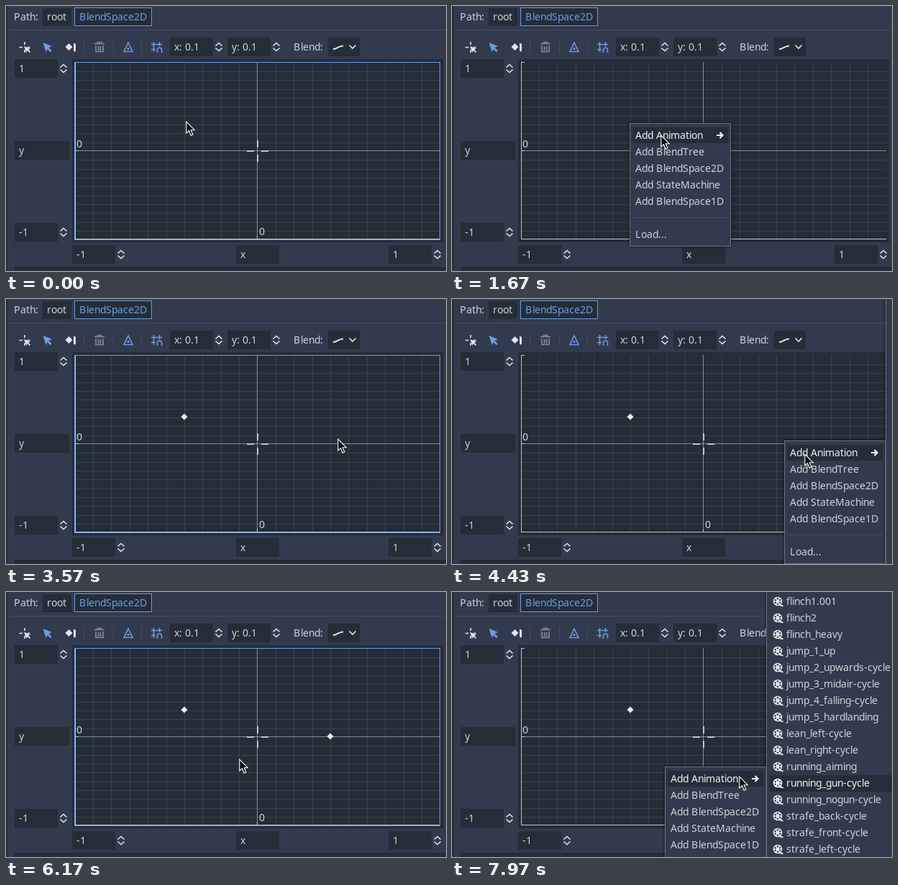
Animation of 612 by 369 pixels, one loop 8000 ms. Source, as an HTML page:

```html
<!DOCTYPE html>
<html lang="en">
<head>
<meta charset="utf-8">
<title>Blend space editor</title>
<style>
  :root { --base: #323a4d; --dark: #242d38; --text: #cfd2d7; --accent: #6a9ce6; --white: #e4e6e9; }
  html, body { margin: 0; width: 100%; height: 100%; overflow: hidden; background: var(--base); }
  svg { display: block; }
  text { font: 14px "Noto Sans", sans-serif; fill: var(--text); white-space: pre; }
  .crisp { shape-rendering: crispEdges; }
  .field { fill: var(--dark); shape-rendering: crispEdges; }
  .sep { fill: #454e62; shape-rendering: crispEdges; }
  .line { fill: none; stroke: var(--white); stroke-width: 1.6; }
  .blue { stroke: var(--accent); }
  .axis { fill: #c3c7cc; }
  .popup { fill: var(--base); stroke: #6b7488; shape-rendering: crispEdges; }
  .shade { filter: drop-shadow(0 0 2px rgba(0, 0, 0, .7)); }
  .hover { fill: #1f2731; shape-rendering: crispEdges; }
  .glow { fill: #222; mix-blend-mode: color-dodge; shape-rendering: crispEdges; }

  .anim { animation: 8s step-end infinite; }
  #cursor { animation-name: cursor; }
  #menu { animation-name: menu; }
  .menu-hover { animation-name: menu-hover; }
  #sub { animation-name: sub; }
  .sub-hover { animation-name: sub-hover; }
  #focus { animation-name: focus; }
  #left { animation-name: left; }
  #right { animation-name: right; }

  @keyframes left { 0% { opacity: 0 } 34.625%, 100% { opacity: 1 } }
  @keyframes right { 0% { opacity: 0 } 70.375%, 100% { opacity: 1 } }
  @keyframes focus {
    0%, 34.625%, 70.375% { opacity: 1 }
    10.875%, 46.625%, 82.125%, 100% { opacity: 0 }
  }
  @keyframes menu {
    0%, 34.625%, 70.375% { opacity: 0; transform: none }
    10.875% { opacity: 1; transform: translate(247px, 163px) }
    46.625% { opacity: 1; transform: translate(462px, 197px) }
    82.125%, 100% { opacity: 1; transform: translate(296px, 243px) }
  }
  @keyframes menu-hover {
    0%, 34.625%, 70.375% { opacity: 0 }
    18.75%, 52.125%, 91.25%, 100% { opacity: 1 }
  }
  @keyframes sub {
    0%, 34.625%, 70.375% { opacity: 0; transform: none }
    21.625% { opacity: 1; transform: translateX(388px) }
    55.375% { opacity: 1; transform: translateX(603px) }
    95%, 100% { opacity: 1; transform: translateX(437px) }
  }
  @keyframes sub-hover {
    0%, 34.625%, 70.375% { opacity: 0; transform: none }
    28.375% { opacity: 1; transform: translateY(163px) }
    65.875% { opacity: 1; transform: translateY(209px) }
    99.625%, 100% { opacity: 1; transform: translateY(255px) }
  }
  @keyframes cursor {
    0% { transform: translate(250px, 160px) }
    4.125% { transform: translate(248px, 160px) }
    5.375% { transform: translate(246px, 160px) }
    12.875% { transform: translate(247px, 160px) }
    17.125% { transform: translate(250px, 161px) }
    17.875% { transform: translate(256px, 164px) }
    18.75% { transform: translate(266px, 169px) }
    19.625% { transform: translate(279px, 175px) }
    20.875% { transform: translate(290px, 179px) }
    21.625% { transform: translate(288px, 180px) }
    24.625% { transform: translate(293px, 180px) }
    25.375% { transform: translate(312px, 179px) }
    26.625% { transform: translate(346px, 177px) }
    27.5% { transform: translate(380px, 174px) }
    28.375% { transform: translate(410px, 173px) }
    29.625% { transform: translate(424px, 173px) }
    39.625% { transform: translate(423px, 166px) }
    40.875% { transform: translate(428px, 154px) }
    42.125% { transform: translate(442px, 163px) }
    43.375% { transform: translate(455px, 182px) }
    44.625% { transform: translate(461px, 194px) }
    50.875% { transform: translate(465px, 198px) }
    52.125% { transform: translate(479px, 208px) }
    53.375% { transform: translate(490px, 215px) }
    60.875% { transform: translate(497px, 215px) }
    62.125% { transform: translate(520px, 215px) }
    62.875% { transform: translate(548px, 215px) }
    64.125% { transform: translate(578px, 215px) }
    65% { transform: translate(600px, 215px) }
    65.875% { transform: translate(608px, 214px) }
    70.375% { transform: translate(526px, 224px) }
    72.125% { transform: translate(508px, 225px) }
    73.375% { transform: translate(470px, 226px) }
    74.625% { transform: translate(424px, 228px) }
    75.875% { transform: translate(370px, 230px) }
    77.125% { transform: translate(324px, 232px) }
    78.75% { transform: translate(297px, 241px) }
    79.625% { transform: translate(295px, 242px) }
    82.125% { transform: translate(295px, 240px) }
    88.75% { transform: translate(297px, 241px) }
    90% { transform: translate(303px, 245px) }
    91.25% { transform: translate(314px, 252px) }
    92.5% { transform: translate(324px, 257px) }
    93.375% { transform: translate(329px, 258px) }
    97.5% { transform: translate(338px, 258px) }
    98.375% { transform: translate(366px, 257px) }
    99.625%, 100% { transform: translate(399px, 256px) }
  }
</style>
</head>
<body>
<svg width="612" height="369" viewBox="0 0 612 369">
  <defs>
    <path id="spin" class="line" d="M-4.500-1.500 0-5.500l4.500 4M-4.500 1.500 0 5.500l4.500-4"/>
    <path id="point" fill="#eceef0" d="M0-4.500 4.500 0 0 4.500-4.500 0Z"/>
    <g id="reel">
      <path d="M1 4.500h3l3.500 1v2l-4-1Z" fill="#e4e6e9"/>
      <circle r="6.300" fill="#e4e6e9"/>
      <g fill="#323a4d">
        <circle cy="-3.700" r="1.200"/><circle cy="3.700" r="1.200"/>
        <circle cx="-3.300" cy="-1.800" r="1.200"/><circle cx="3.300" cy="-1.800" r="1.200"/>
        <circle cx="-3.300" cy="1.800" r="1.200"/><circle cx="3.300" cy="1.800" r="1.200"/>
      </g>
    </g>
  </defs>

  <rect width="612" height="369" fill="var(--base)"/>
  <rect class="field" width="2" height="369"/>
  <rect class="sep" x="4" y="33" width="608" height="1"/>
  <rect class="field" x="12" y="363" width="600" height="6"/>

  <!-- path bar -->
  <text x="11" y="20">Path:</text>
  <rect class="field" x="51" y="3" width="40" height="25"/>
  <text x="57" y="20">root</text>
  <rect class="field blue" x="95.5" y="2.5" width="107" height="25"/>
  <text x="102" y="20" style="fill:var(--accent)">BlendSpace2D</text>

  <!-- toolbar -->
  <path class="line" d="M26 50v4M18.500 57.500h4.500M29.500 57.500h4M26 61v4"/>
  <path fill="var(--white)" d="m25 56 9 3.500-3 1.200 3 3-1.300 1.300-3-3-1.200 3Z"/>
  <path fill="var(--accent)" d="m51.500 51 12.500 5-4.600 2 4.300 4.300-2 2-4.300-4.300-1.700 4.400Z"/>
  <path fill="var(--white)" d="m87.500 52 5 5-5 5-5-5ZM94 51.500l3 1.500v9l-1.500 2-1.500-2Z"/>
  <path class="line" style="stroke:#858c99" d="M123 52.500h14M127.500 52v-1.500h5v1.500M125 55v8.500h10v-8.500M128.500 56v6M131.500 56v6"/>
  <path class="line blue" d="m170 51 6 12.500h-12Z"/>
  <circle cx="170" cy="59.500" r="1.600" fill="var(--accent)"/>
  <path class="line blue" d="M205.500 50v14M202 53.500h15M213.500 50v6M202 60.500h6M210.500 65v-4a3 3 0 0 1 6 0v4"/>
  <rect class="sep" x="108" y="49" width="1" height="17"/>
  <rect class="sep" x="149" y="49" width="1" height="17"/>
  <rect class="sep" x="188" y="49" width="1" height="17"/>
  <text x="400" y="62">Blend:</text>
  <rect class="field" x="448" y="44" width="44" height="26"/>
  <path class="line" style="stroke-width:2" d="M455 60c6 0 7-4.500 14-4.500"/>
  <path class="line" d="m477.500 54.500 4.500 4.500 4.500-4.500"/>
  <g id="fields"></g>

  <!-- graph -->
  <rect class="field" x="92" y="74" width="516" height="255"/>
  <g id="grid" class="crisp" fill="#fff"></g>
  <g class="crisp">
    <rect class="axis" x="96" y="78" width="1" height="247"/>
    <rect class="axis" x="96" y="324" width="508" height="1"/>
    <path class="axis" d="M96 78h5v1h-5ZM96 201h5v1h-5ZM349 320h1v5h-1Z"/>
    <rect id="focus" class="anim" x="95.500" y="78.500" width="508" height="247" fill="none" stroke="#6a9ce6"/>
  </g>
  <text x="98" y="197">0</text>
  <text x="352" y="319">0</text>
  <path class="axis crisp" d="M335 201h10v2h-10ZM355 201h10v2h-10ZM349 187h2v10h-2ZM349 207h2v10h-2Z"/>
  <g id="left" class="anim"><use href="#point" x="248" y="164"/></g>
  <g id="right" class="anim"><use href="#point" x="451" y="201"/></g>

  <g id="menu" class="anim">
    <rect class="popup shade" x=".5" y=".5" width="140" height="171"/>
    <rect class="hover menu-hover anim" x="4" y="6" width="133" height="22"/>
    <rect class="sep" x="4" y="131" width="133" height="1"/>
    <path class="line" style="stroke-width:2" d="M121 17h8M125.500 13l4 4-4 4"/>
    <g id="menuRows"></g>
    <rect class="glow menu-hover anim" x="4" y="6" width="133" height="22"/>
  </g>

  <g id="sub" class="anim">
    <rect class="popup shade" x=".5" y="-9.500" width="181" height="400"/>
    <rect class="hover sub-hover anim" x="5" width="173" height="23"/>
    <g id="subRows"></g>
    <rect class="glow sub-hover anim" x="5" width="173" height="23"/>
  </g>

  <g id="cursor" class="anim">
    <path d="M.8 1v16l3.700-3.300 2.700 6.500 2.700-1.200-2.700-6.300h5Z" fill="#0c0e12" stroke="#fff" stroke-width="1.100"/>
  </g>
</svg>
<script>
  const add = (id, html) => { document.getElementById(id).innerHTML += html; };
  const label = (x, y, s) => `<text x="${x}" y="${y}">${s}</text>`;
  const bar = (x, y, w, h, o) => `<rect x="${x}" y="${y}" width="${w}" height="${h}" opacity="${o}"/>`;

  function field(x, y, s, spin = true, w = 60) {
    const arrows = spin ? `<use href="#spin" x="${x + w + 8}" y="${y + 13}"/>` : '';
    add('fields', `<rect class="field" x="${x}" y="${y}" width="${w}" height="26"/>` + label(x + 6, y + 18, s) + arrows);
  }
  field(228, 44, 'x: 0.1');
  field(308, 44, 'y: 0.1');
  field(12, 74, '1');
  field(12, 188, 'y', false, 76);
  field(12, 302, '-1');
  field(92, 333, '-1');
  field(320, 333, 'x', false);
  field(532, 333, '1');

  // Grid lines snap to the first whole pixel past each step, mirrored about zero.
  const snap = (size, i) => Math.ceil(size * i / 20 + (i < 10 ? .01 : -.01));
  let grid = bar(349, 78, 1, 247, .45) + bar(96, 201, 508, 1, .45);
  for (let i = 1; i < 20; i++) {
    if (i === 10) continue;
    grid += bar(95 + snap(508, i), 78, 1, 247, .1);
    grid += bar(96, 78 + snap(247, i), 508, 1, .1);
  }
  add('grid', grid);

  const kinds = ['Animation', 'BlendTree', 'BlendSpace2D', 'StateMachine', 'BlendSpace1D'];
  kinds.forEach((kind, i) => add('menuRows', label(8, 22 + 23 * i, 'Add ' + kind)));
  add('menuRows', label(8, 160, 'Load...'));

  const clips = ['flinch1.001', 'flinch2', 'flinch_heavy', 'jump_1_up', 'jump_2_upwards-cycle',
    'jump_3_midair-cycle', 'jump_4_falling-cycle', 'jump_5_hardlanding', 'lean_left-cycle',
    'lean_right-cycle', 'running_aiming', 'running_gun-cycle', 'running_nogun-cycle',
    'strafe_back-cycle', 'strafe_front-cycle', 'strafe_left-cycle'];
  clips.forEach((clip, i) => add('subRows',
    `<use href="#reel" x="16" y="${13 + 23 * i}"/>` + label(28, 18 + 23 * i, clip)));

  // Hinted type: every glyph advances by whole pixels, without kerning.
  const pen = document.createElement('canvas').getContext('2d');
  pen.font = '14px "Noto Sans", sans-serif';
  function advance(ch) {
    const w = pen.measureText(ch).width;
    return /[a-z_]/.test(ch) ? Math.floor(w + 1 / 3) : Math.ceil(w - .05);
  }
  for (const text of document.querySelectorAll('text')) {
    let x = +text.getAttribute('x');
    const places = [...text.textContent].map(ch => (x += advance(ch)) - advance(ch));
    text.setAttribute('x', places.join(' '));
  }
</script>
</body>
</html>
```
